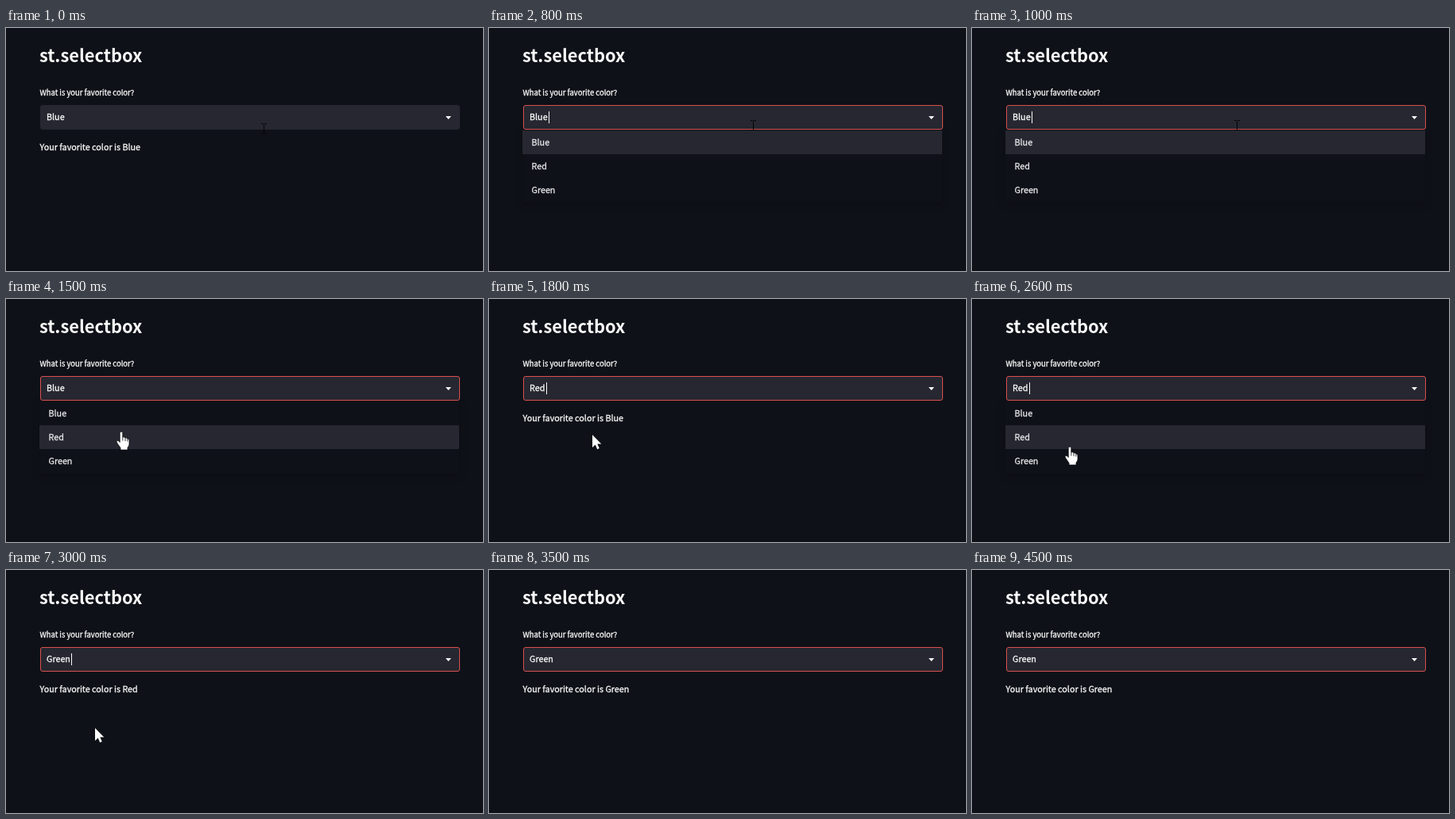
Write an HTML page that moves like this. It is 600 by 306 pixels and loops after 4.6 s.

```html
<!DOCTYPE html>
<html lang="en">
<head>
<meta charset="utf-8">
<title>st.selectbox</title>
<style>
  html, body { margin: 0; width: 100%; height: 100%; overflow: hidden; background: #0e1117; }
  svg { display: block; }
  text {
    font: 10.75px "Noto Sans CJK JP", "Noto Sans CJK SC", "Noto Sans", sans-serif;
    fill: #fafafa; stroke: #fafafa; stroke-width: .3;
  }
  .title { font-size: 21.85px; font-weight: 600; stroke: none; }
  .label { font-size: 9.45px; }
  #menu text { fill: #e8e8ec; stroke: #e8e8ec; }
  #panel { filter: drop-shadow(0 3px 5px rgba(0, 0, 0, .2)); }
  #arrow, #hand { fill: #fff; stroke: #0a0c10; stroke-width: .8; }
  #arrow { paint-order: stroke; }
</style>
</head>
<body>
<svg width="600" height="306" viewBox="0 0 600 306">
  <text class="title" x="42" y="43">st.selectbox</text>
  <text class="label" x="42.5" y="85">What is your favorite color?</text>
  <text id="result" x="42.5" y="154"></text>
  <g id="menu">
    <rect id="panel" x="42" y="128" width="528" height="91" fill="#0e1117"/>
    <rect id="hover" x="42" width="528" height="30" fill="#262730"/>
  </g>
  <rect id="box" x="43.5" y="97.5" width="527" height="30" rx="2.5" fill="#262730"/>
  <text id="value" x="51" y="116"></text>
  <rect id="caret" y="105" width="1" height="15" fill="#fafafa"/>
  <path d="M553 111h7l-3.500 4z" fill="#fafafa"/>
  <path id="ibeam" d="M-3.500-6h2.500l1 1 1-1h2.500M0-5V5M-3.500 6h2.500l1-1 1 1h2.500" fill="none" stroke="#030405"/>
  <path id="arrow" d="M0 0V16L3.700 12.600 6.200 18.200 8.800 17 6.300 11.600H11.300Z"/>
  <g id="hand">
    <path d="M-1.800 1.500Q-1.800 0 0 0T1.800 1.500V7Q4.500 6 5 8Q7.300 7.200 7.800 9Q10 8.500 10 11V16Q10 18 8 20V23H-1V20.500L-5.500 14Q-6.500 12 -5 11.300T-1.800 13.500Z"/>
    <path d="M1.800 7v4.500M5 8v4M7.800 9v3.500" fill="none"/>
  </g>
</svg>
<script>
const LOOP = 4600, STEP = 100, BLINK = 500;
const MENU_TOP = 129, ROW = 30;
const colors = ["Blue", "Red", "Green"];
// each click opens the menu or picks the next colour
const clicks = [800, 1700, 2300, 3000];
// where the pointer rests: time, x, y
const stops = [
  [0, 324, 126], [1000, 333, 122], [1600, 130, 171], [1900, 130, 171],
  [2300, 144, 117], [2600, 123, 186], [3000, 112, 199], [3500, 106, 229]
];
const $ = id => document.getElementById(id);
const show = (id, on) => $(id).setAttribute("visibility", on ? "visible" : "hidden");
const clicksBy = t => clicks.filter(at => t >= at).length;
const ease = k => k * k * (3 - 2 * k);

function pointer(t) {
  const i = stops.findIndex(s => s[0] > t);
  if (i < 0) return null;
  const [t0, x0, y0] = stops[i - 1], [t1, x1, y1] = stops[i];
  const k = ease((t - t0) / (t1 - t0));
  return { x: Math.round(x0 + (x1 - x0) * k), y: Math.round(y0 + (y1 - y0) * k) };
}

function pointerShape(at, open) {
  if (!at) return "";
  if (at.y < 138) return "ibeam";
  return open ? "hand" : "arrow";
}

function draw(t) {
  const count = clicksBy(t);
  const open = count % 2 === 1;
  const picked = count >> 1;
  const at = pointer(t);
  const shape = pointerShape(at, open);

  $("value").textContent = colors[picked];
  // the sentence follows the choice a little later
  $("result").textContent = "Your favorite color is " + colors[clicksBy(t - 200) >> 1];
  $("box").setAttribute("stroke", count ? "#d9504f" : "#262730");
  $("caret").setAttribute("x", Math.round(52.2 + $("value").getComputedTextLength()));
  show("caret", count && Math.floor((t - clicks[count - 1]) / BLINK) % 2 === 0);

  const row = shape === "hand" ? Math.floor((at.y - MENU_TOP) / ROW) : picked;
  $("hover").setAttribute("y", MENU_TOP + ROW * row);
  show("menu", open);

  for (const id of ["ibeam", "arrow", "hand"]) show(id, id === shape);
  if (shape) {
    const snap = shape === "ibeam" ? .5 : 0;
    $(shape).setAttribute("transform", `translate(${at.x + snap} ${at.y + snap})`);
  }
}

colors.forEach((name, i) => {
  const item = document.createElementNS("http://www.w3.org/2000/svg", "text");
  item.setAttribute("x", 53.5);
  item.setAttribute("y", MENU_TOP + ROW * i + 19);
  item.textContent = name;
  $("menu").append(item);
});

const start = performance.now();
function tick() {
  const t = (performance.now() - start) % LOOP;
  draw(Math.floor(t / STEP) * STEP);
  requestAnimationFrame(tick);
}
tick();
</script>
</body>
</html>
```
